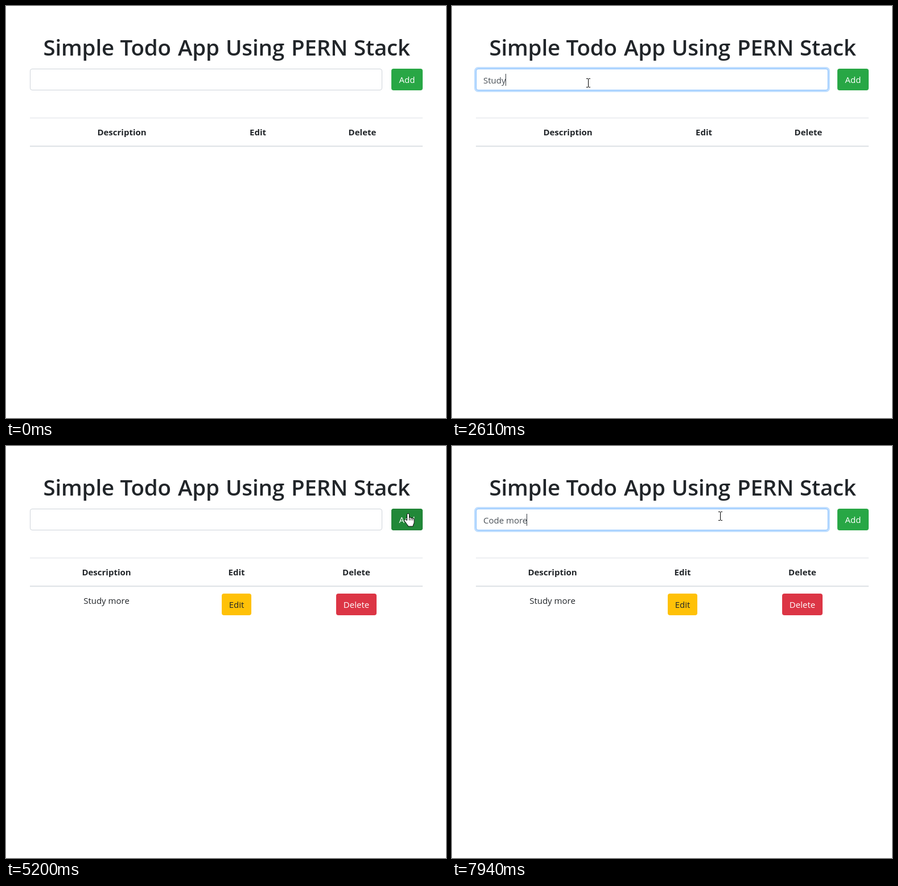
An HTML page for the animation above (8 s loop, 773 by 723 pixels).

```html
<!DOCTYPE html>
<html lang="en">
<head>
<meta charset="utf-8">
<title>Simple Todo App</title>
<style>
  html, body { margin: 0; width: 100%; height: 100%; overflow: hidden; background: #fff; }
  svg { display: block; width: 773px; height: 723px; }
  text { font: 15px "Open Sans", "Noto Sans", sans-serif; fill: #212529; white-space: pre; }
  .title { font-size: 38.5px; font-weight: 600; letter-spacing: -.2px; }
  .head { font-weight: 700; }
  .mid { text-anchor: middle; }
  .light { fill: #fff; }
</style>
</head>
<body>
<svg viewBox="0 0 773 723">
  <text class="title" y="86.5"><tspan x="65.5">Simple</tspan> <tspan x="200.5">Todo</tspan> <tspan x="302">App</tspan> <tspan x="386">Using</tspan> <tspan x="501">PERN</tspan> <tspan x="611">Stack</tspan></text>

  <rect x="42.5" y="110.5" width="618" height="37" rx="3.5" fill="#fff" stroke="#ced4da"/>
  <g id="inputFocus">
    <rect id="inputRing" x="42" y="110" width="619" height="38" rx="4" stroke="#bfdeff"/>
    <rect x="42.5" y="110.5" width="618" height="37" rx="3.5" fill="#fff" stroke="#80bdff"/>
  </g>
  <text id="typed" x="55" y="136" style="fill:#495057"></text>
  <rect id="caret" y="119" width="1" height="21" fill="#343a40"/>

  <rect id="buttonRing" x="677" y="110" width="55" height="38" rx="4" stroke="#a3d9b0"/>
  <rect x="677" y="110" width="55" height="38" rx="4" fill="#28a745"/>
  <rect id="hover" x="677.5" y="110.5" width="54" height="37" rx="3.5" fill="#218838" stroke="#1e7e34"/>
  <rect id="pressed" x="677" y="110" width="55" height="38" rx="4" fill="#1e7e34"/>
  <text class="mid light" x="704.5" y="135">Add</text>

  <path d="M42 196.5H732" stroke="#dee2e6"/>
  <path d="M42 246H732" stroke="#dee2e6" stroke-width="2"/>
  <text class="head mid" y="227">Description</text>
  <text class="head mid" y="227">Edit</text>
  <text class="head mid" y="227">Delete</text>
  <g id="row">
    <text class="mid" x="176.5" y="277">Study more</text>
    <rect x="379" y="259" width="52" height="38" rx="4" fill="#ffc107"/>
    <text class="mid" x="405" y="284">Edit</text>
    <rect x="580" y="259" width="71" height="38" rx="4" fill="#dc3545"/>
    <text class="mid light" x="615.5" y="284">Delete</text>
  </g>

  <g id="pointer">
    <circle id="click" cx="-2" cy="-1.5" r="14.7" fill="#ff0" fill-opacity=".5"/>
    <path id="arrow" d="M0 0V17l4-3.8 2.5 6 2.8-1.2-2.5-5.8H12z" fill="#fff" stroke="#000"/>
    <path id="beam" d="M-3-7.5h3M1-7.5h3M.5-7V7M-3 7.5h3M1 7.5h3" fill="none" stroke="#000"/>
    <path id="hand" d="M-2 12V2a2 2 0 0 1 4 0v6a1.5 1.5 0 0 1 3 0v1a1.5 1.5 0 0 1 3 0v1a1.3 1.3 0 0 1 2.6 0v5q0 2-1 3.5t-1 4H0q0-1.5-2-3.5L-6.5 13q-.8-1.5.3-2.3t2.4.3zM2 8v4M5 9v3M8 10v2" fill="#fff" stroke="#000" stroke-linejoin="round"/>
  </g>
</svg>
<script>
const LOOP = 8000, BLINK = 540, RELOAD = 5100, ROW_ADDED = 5200, RING = 3;
const $ = id => document.getElementById(id);
const heads = document.querySelectorAll('.head');
const shapes = ['arrow', 'beam', 'hand'];

// time, x, y, shape: the pointer is sampled, so it jumps from point to point
const pointerPath = [
  [170, 262, 657, 'arrow'], [260, 266, 560, 'arrow'], [350, 262, 430, 'arrow'],
  [440, 255, 310, 'arrow'], [530, 248, 220, 'arrow'], [630, 242, 160, 'arrow'],
  [720, 239, 137, 'beam'], [810, 239, 135, 'beam'],
  [3590, 250, 138, 'beam'], [3680, 400, 158, 'arrow'], [3760, 590, 172, 'arrow'],
  [3850, 702, 176, 'arrow'], [3940, 706.5, 123.5, 'hand'], [4030, 706.5, 119.5, 'hand'],
  [4120, 706.5, 118.5, 'hand'],
  [5390, 690, 120, 'hand'], [5480, 620, 122, 'beam'], [5570, 530, 123, 'beam'],
  [5650, 485, 123, 'beam'], [5740, 471, 123, 'beam']
];
const clicks = [[810, 990], [4200, 4480], [5830, 5920]];
const entries = [
  { text: 'Study more', focus: 900, blur: 4200, clear: RELOAD,
    keys: [1980, 2170, 2350, 2430, 2610, 2790, 2880, 2970, 3060, 3230] },
  { text: 'Code more', focus: 5830, blur: LOOP, clear: LOOP,
    keys: [6740, 7100, 7200, 7380, 7470, 7560, 7740, 7850, 7940] }
];

const within = (t, from, to) => t >= from && t < to;
const ramp = (t, start, length = 150) => Math.min(1, Math.max(0, (t - start) / length));
const pulse = (t, on, off) => ramp(t, on) - ramp(t, off);
const show = (id, visible) => $(id).style.display = visible ? '' : 'none';
const fade = (id, amount) => $(id).style.opacity = amount;
// The inner half of the stroke is covered by the box on top of it.
const spread = (id, amount) => $(id).style.strokeWidth = 2 * RING * amount;

function drawInput(t) {
  const entry = entries[t < RELOAD ? 0 : 1];
  const pressed = entry.keys.filter(time => time <= t);
  const lastChange = pressed.length ? pressed[pressed.length - 1] : entry.focus;
  const typed = $('typed');
  typed.textContent = t < entry.clear ? entry.text.slice(0, pressed.length) : '';
  const focus = pulse(t, 830, 4140) + ramp(t, 5770);
  fade('inputFocus', focus);
  spread('inputRing', focus);
  const blinkOn = Math.floor((t - lastChange) / BLINK) % 2 === 0;
  show('caret', within(t, entry.focus, entry.blur) && blinkOn);
  $('caret').setAttribute('x', 55 + Math.round(pressed.length && typed.getComputedTextLength() - 1));
}

function drawButton(t) {
  const focus = t < RELOAD ? ramp(t, 4140) : 0;
  fade('hover', pulse(t, 3960, 5390));
  fade('pressed', pulse(t, 4180, 4470));
  fade('buttonRing', focus);
  spread('buttonRing', focus);
}

function drawTable(t) {
  const added = t >= ROW_ADDED;
  const centers = added ? [176.5, 405, 615.5] : [203.5, 442.5, 626];
  heads.forEach((head, i) => head.setAttribute('x', centers[i]));
  show('row', added);
}

function drawPointer(t) {
  const point = pointerPath.filter(([time]) => time <= t).pop();
  show('pointer', point);
  if (!point) return;
  const [, x, y, shape] = point;
  $('pointer').setAttribute('transform', `translate(${x} ${y})`);
  shapes.forEach(name => show(name, name === shape));
  show('click', clicks.some(([from, to]) => within(t, from, to)));
}

const start = performance.now();
function frame() {
  const t = (performance.now() - start) % LOOP;
  drawInput(t);
  drawButton(t);
  drawTable(t);
  drawPointer(t);
  requestAnimationFrame(frame);
}
frame();
</script>
</body>
</html>
```
